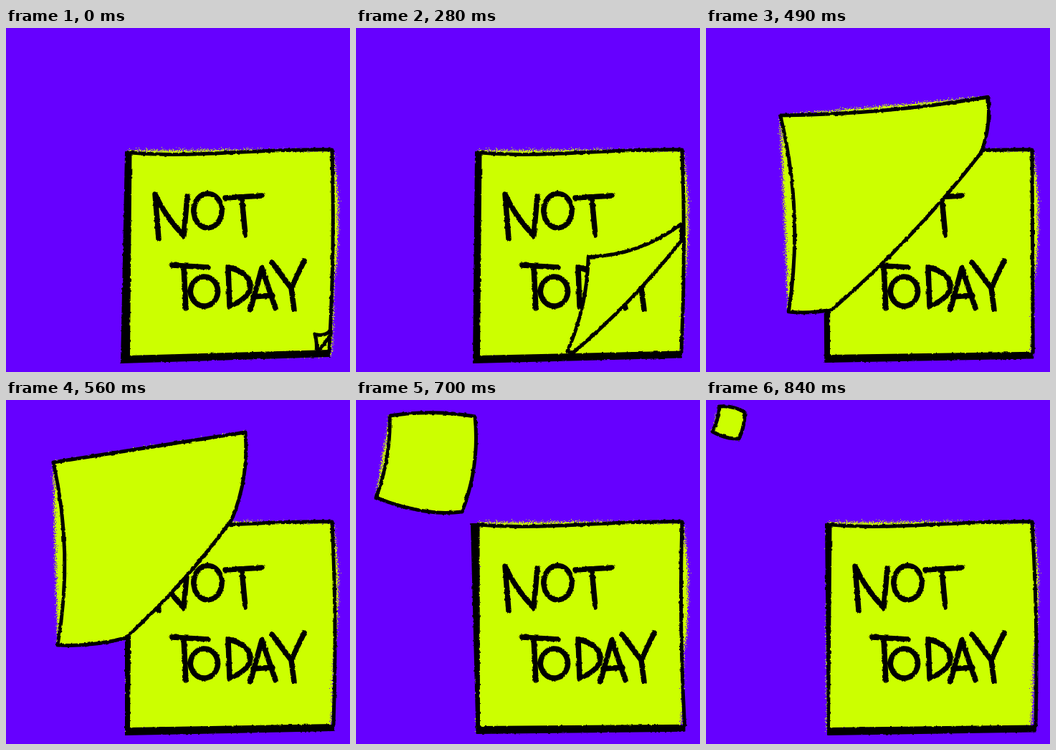
Animation of 480x480 px, one loop 910 ms. Source, as an HTML page:

```html
<!DOCTYPE html>
<html>
<head>
<meta charset="utf-8">
<style>
  html, body { margin: 0; width: 100%; height: 100%; overflow: hidden; background: #60f; }
  svg { display: block; width: 480px; height: 480px; }
  .paper { fill: #cf0; }
  .line { fill: none; stroke: #000; stroke-width: 5; stroke-linecap: round; stroke-linejoin: round; }
  .ink { stroke-width: 7.5; }
  .flap { fill: #cf0; }
</style>
</head>
<body>
<svg viewBox="0 0 480 480">
  <defs>
    <filter id="rough" filterUnits="userSpaceOnUse" x="0" y="0" width="480" height="480" color-interpolation-filters="sRGB">
      <feTurbulence type="fractalNoise" baseFrequency=".2" numOctaves="2" seed="4"/>
      <feDisplacementMap in="SourceGraphic" scale="3" xChannelSelector="R" yChannelSelector="G"/>
    </filter>
    <filter id="spray" filterUnits="userSpaceOnUse" x="0" y="0" width="480" height="480" color-interpolation-filters="sRGB">
      <feTurbulence type="fractalNoise" baseFrequency=".8" numOctaves="2" seed="9"/>
      <feDisplacementMap in="SourceGraphic" scale="14" xChannelSelector="R" yChannelSelector="G"/>
    </filter>
  </defs>
  <rect width="480" height="480" fill="#60f"/>
  <g class="paper" filter="url(#spray)">
    <path id="dust"/>
    <path d="M169 171L300 170 456 171Q470 260 458 350L454 457 169 460Z"/>
  </g>
  <g filter="url(#rough)">
    <path id="band" stroke="#000" stroke-width="2" stroke-linejoin="round"/>
    <path id="edge" class="line"/>
    <g class="line ink" transform="translate(0 1)">
      <path d="M213 293L208 231Q222 262 248 289L253 234"/>
      <path d="M282 230a19.5 24 0 1 1-1 0M306 236L357 233M329 236L334 288"/>
      <path d="M232 330L282 333M248 333L251 390M277 346a19 20.5 0 1 1-1 0"/>
      <path d="M310 333L312 387C352 372 350 342 310 333"/>
      <path d="M341 392L357 334 376 390M345 374L372 372M371 326L398 362M416 324L398 362 402 392"/>
    </g>
    <path id="flap" class="line flap"/>
  </g>
</svg>
<script>
const STEP = 70, STEPS = 13, PEEL_END = 3;

// Corners of the torn-off sheet as it leaves, clockwise from the top left.
const flight = [
  [[66, 87], [334, 45], [315, 167], [167, 332], [72, 342]],
  [[47, 22], [166, 23], [148, 156], [112, 157], [28, 136]],
  [[19, 9], [54, 17], [46, 54], [32, 53], [9, 44]]
];

const mix = (a, b, t) => a + (b - a) * t;

// The fold climbs quadratically while its tip runs ahead exponentially.
function peel(k) {
  const reach = 25 + 30 * k + 17.5 * k * k;
  const foldX = 458 - reach, foldY = 453 - reach;
  return [
    [453 - 22 * 2.42 ** k, 455 - 28 * 2.2 ** k],
    [453, foldY - 6 - 9 * k],
    [453, foldY],
    [foldX, 453],
    [foldX - k ** 3, 453 - k]
  ];
}

function sheetCorners(k) {
  if (k <= PEEL_END) return peel(k);
  const poses = [peel(PEEL_END), ...flight];
  const i = Math.min(Math.floor(k) - PEEL_END, poses.length - 2);
  const t = k - PEEL_END - i;
  return poses[i].map((p, j) => p.map((v, n) => mix(v, poses[i + 1][j][n], t)));
}

// Quadratic whose middle is offset from the chord by a share of its length.
function bowed([x0, y0], [x1, y1], bow) {
  const dx = x1 - x0, dy = y1 - y0;
  return `Q${(x0 + x1) / 2 - 2 * bow * dy} ${(y0 + y1) / 2 + 2 * bow * dx} ${x1} ${y1}`;
}

function setPath(id, d) { document.getElementById(id).setAttribute('d', d); }

function drawSheet(k) {
  const corners = sheetCorners(k);
  const bows = [0.16 - 0.04 * k, -0.06, -0.025, -0.04, 0.05];
  const edges = corners.map((p, i) => bowed(p, corners[(i + 1) % 5], bows[i]));
  setPath('flap', `M${corners[0]}${edges.join('')}Z`);
  setPath('dust', `M${corners.join('L')}Z`);
}

// The pad outline sways from drawing to drawing and drifts a little right.
function drawPad(k) {
  const sway = 3 * Math.cos(Math.PI * k), drift = 1.5 * k;
  const left = 164 + sway, inner = 173 + sway / 2, right = 451 + drift;
  const bottom = 457 + sway / 3, rightBottom = 450 + drift / 2;
  setPath('band', `M${left} 173H${inner}L172 ${bottom} ${right} ${rightBottom}` +
    `V${rightBottom + 8}L${161 + drift} ${bottom + 9}Z`);
  setPath('edge', `M${inner} 174C260 182 350 168 455 170` +
    bowed([455, 170], [right, rightBottom], -sway / 280));
}

let shown = -1;
function frame() {
  const step = Math.floor(performance.now() / STEP) % STEPS;
  if (step !== shown) {
    shown = step;
    drawSheet(step / 2);
    drawPad(step / 2);
  }
  requestAnimationFrame(frame);
}
frame();
</script>
</body>
</html>
```
